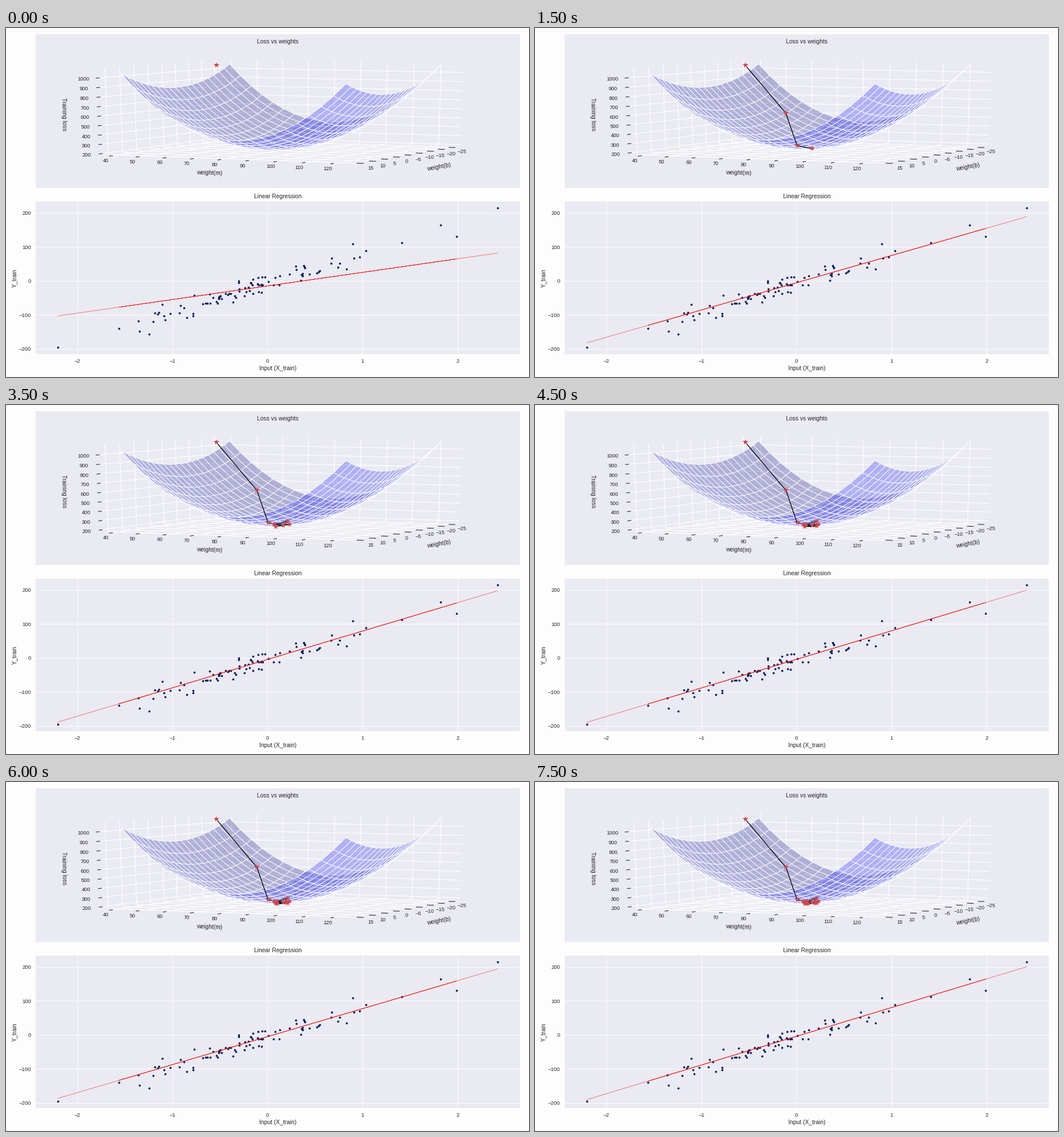
Recreate the animation shown at these times as a matplotlib script. Size 917 by 611 pixels, loop 8000 ms.

```python
import numpy as np
import matplotlib.pyplot as plt
from matplotlib.animation import FuncAnimation
from matplotlib.collections import LineCollection, PolyCollection
from matplotlib.patches import Rectangle

W, H = 917, 611
STEPS = 16
INK, PANEL = "#262626", "#eaeaf2"
TICK, LABEL = 9.35, 10.2
plt.rcParams["font.family"] = "Liberation Sans"

# One unit equals one pixel, y pointing down
fig = plt.figure(figsize=((W + 0.001) / 72, (H + 0.001) / 72), dpi=72,
                 facecolor="#fdfdfd")
ax = fig.add_axes([0, 0, 1, 1])
ax.set_xlim(0, W)
ax.set_ylim(H, 0)
ax.axis("off")


def put(x, y, s, size=LABEL, ha="center", rot=0):
    return ax.text(x, y, s, size=size, ha=ha, va="center", rotation=rot,
                   color=INK, zorder=6)


def num(v):
    return str(v).replace("-", "\u2212")


def panel(top, bottom):
    ax.add_patch(Rectangle((52, top), 849, bottom - top, color=PANEL, lw=0,
                           zorder=1))


# --- Loss surface -----------------------------------------------------------
AZ, EL = np.radians(25), np.radians(10)
M0, B0, Z_TOP = 82, -5.2, 1080
EDGE, PAD = 0.5208, 0.5578
TICK_OUT, TICK_IN = EDGE + 0.0083, EDGE - 0.0167


def project(p, q, t):
    """Perspective view of the unit box centred on zero; b, m, loss axes."""
    side = q * np.cos(AZ) - p * np.sin(AZ)
    near = p * np.cos(AZ) + q * np.sin(AZ)
    depth = 10 - near * np.cos(EL) - t * np.sin(EL)
    rise = t * np.cos(EL) - near * np.sin(EL)
    return 488 + 4589 * side / depth, 141.4 - 1451 * rise / depth, depth


def path(*pts):
    return [project(*pt)[:2] for pt in pts]


def loss(dm, db):
    return (198 + 641 * dm**2 + 200 * db**2
            - 6 * dm - 27.5 * db - 20.5 * dm * db)


def surface(norm_z, n=20):
    g = np.linspace(-1, 1, n)
    dm, db = np.meshgrid(g, g)
    x, y, depth = project(db / 2.2, dm / 2.2, norm_z(loss(dm, db)))

    def corners(a):
        return np.stack([a[:-1, :-1], a[:-1, 1:], a[1:, 1:], a[1:, :-1]],
                        -1).reshape(-1, 4)

    cm, cb = corners(dm).mean(1), corners(db).mean(1)
    gm = (1282 * cm - 6 - 20.5 * cb) / 40
    gb = (400 * cb - 27.5 - 20.5 * cm) / 20
    light = (gm + gb + 0.5) / np.sqrt(gm**2 + gb**2 + 1)
    light = 0.5 + 0.5 * (light - light.min()) / np.ptp(light)
    color = np.zeros((len(light), 4))
    color[:, 2], color[:, 3] = light, 0.25
    order = np.argsort(-corners(depth).mean(1))
    quads = np.stack([corners(x), corners(y)], -1)
    return PolyCollection(quads[order], facecolors=color[order],
                          edgecolors="white", linewidths=0.85, zorder=3)


def scene(z_low):
    def norm_z(z):
        return (z - z_low) / (Z_TOP - z_low) - 0.5

    e, grid, dashes, texts = EDGE, [], [], []

    def tick_text(v, *pos):
        x, y, _ = project(*pos)
        texts.append(put(x, y + 2, num(v), TICK))

    for m in range(40, 121, 10):
        q = (m - M0) / 88
        grid.append(path((e, q, -e), (-e, q, -e), (-e, q, e)))
        dashes.append(path((TICK_OUT, q, -e), (TICK_IN, q, -e)))
        tick_text(m, PAD, q, -PAD)
    for b in range(-25, 16, 5):
        p = (b - B0) / 44
        grid.append(path((p, e, -e), (p, -e, -e), (p, -e, e)))
        dashes.append(path((p, TICK_OUT, -e), (p, TICK_IN, -e)))
        tick_text(b, p, PAD, -PAD)
    for z in range(200, 1001, 100):
        t = norm_z(z)
        grid.append(path((e, -e, t), (-e, -e, t), (-e, e, t)))
        dashes.append(path((TICK_OUT, -e, t), (TICK_IN, -e, t)))
        tick_text(z, PAD, -PAD, t)

    parts = [LineCollection(grid, colors="white", linewidths=1.2, zorder=2),
             LineCollection(dashes, colors=INK, linewidths=1.1,
                            capstyle="projecting", zorder=2.5),
             surface(norm_z)]
    for part in parts:
        ax.add_collection(part, autolim=False)
    return parts + texts


panel(11, 280)
put(476.5, 24, "Loss vs weights")
put(356.5, 254, "weight(m)", rot=-2)
put(759.5, 243, "weight(b)", rot=10)
put(102, 151, "Training loss", rot=-89)
scenes = scene(199), scene(190)

# The descent reaches the valley, then swings around its floor
DESCENT = [(369, 65.5), (440, 149.5), (459.5, 206), (486, 211.5), (493, 204)]


def swing(k):
    reach = 14 * (-1)**k * np.exp(-0.1 * (k - len(DESCENT)))
    return 484 + reach, 211 + 2.5 * np.cos(1.7 * k)


trail = np.array(DESCENT + [swing(k) for k in range(len(DESCENT), STEPS)])
track, = ax.plot([], [], color="black", lw=1.3, zorder=4)
stars, = ax.plot([], [], "*", color="#c9484f", ms=10, mew=0, zorder=5)


# --- Regression -------------------------------------------------------------
def sx(x):
    return 458.3 + 166.8 * x


def sy(y):
    return 443 - 0.595 * y


panel(304, 571.5)
for x in range(-2, 3):
    ax.plot([sx(x)] * 2, [304, 571.5], color="white", lw=0.9, zorder=2)
    put(sx(x), 583, num(x), TICK)
for y in range(-200, 201, 100):
    ax.plot([52, 901], [sy(y)] * 2, color="white", lw=0.9, zorder=2)
    put(44, sy(y) + 0.5, num(y), TICK, ha="right")
put(476.5, 295, "Linear Regression")
put(476.5, 595.5, "Input (X_train)")
put(15, 437.5, "Y_train", rot=90)

# A noisy line of samples plus the few that stand apart
rng = np.random.default_rng(7)
xs = rng.normal(-0.15, 0.78, 96)
xs = xs[np.abs(xs) < 1.52]
ys = 82 * xs - 3 + rng.normal(0, 17, len(xs))
apart = [(-2.2, -195), (-1.56, -140), (-1.24, -157), (1.82, 165),
         (1.99, 131), (2.42, 215)]
ax_, ay_ = np.transpose(apart)
ax.plot(sx(np.append(xs, ax_)), sy(np.append(ys, ay_)), "o",
        color="#08205a", ms=3.7, mew=0, zorder=4)


def fit(k):
    """Slope and intercept after k steps: fast approach, then a wobble."""
    left = 0.41**k
    wobble = (1 - left) * np.cos(1.5 * (k - 10))
    return 84 - 44 * left + 1.6 * wobble, -4 - 10.5 * left + 0.8 * wobble


# Thin strokes retrace the line, so all but its ends look solid
spans = [(-2.2, 2.42)] + [(-1.56, 1.99)] * 4
strokes = [ax.plot([], [], color="red", lw=0.5, zorder=5)[0] for _ in spans]


def update(k):
    settled = k >= 3
    for group, shown in zip(scenes, (not settled, settled)):
        for part in group:
            part.set_visible(shown)

    for artist in (track, stars):
        artist.set_data(*trail[:k + 1].T)

    slope, base = fit(k)
    for stroke, span in zip(strokes, spans):
        x = np.array(span)
        stroke.set_data(sx(x), sy(base + slope * x))
    return [track, stars, *strokes]


anim = FuncAnimation(fig, update, frames=STEPS, interval=500,
                     repeat=True, repeat_delay=0, blit=False)
plt.show()
```
